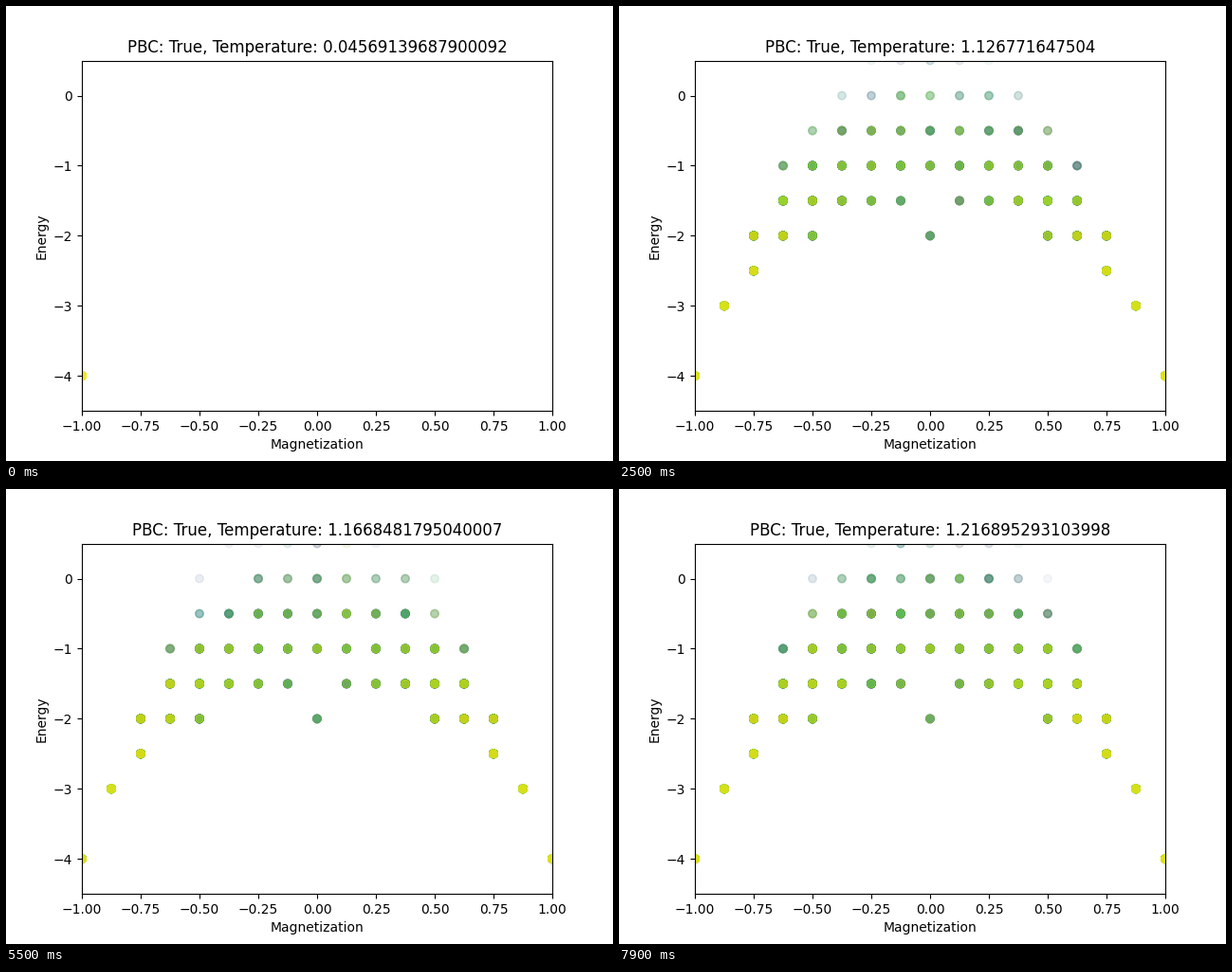
Write a matplotlib script that moves like this. It is 640x480 px and loops after 8000 ms.

```python
import numpy as np
import matplotlib.pyplot as plt
from matplotlib.animation import FuncAnimation

FRAMES = 80
SAMPLES = 20000
ALPHA = 0.05
RECENT = 60

KEY_FRAMES = [0, 4, 8, 12, 25, 37, 55, 64, 79]
KEY_TEMPS = [0.04569139687900092, 0.45136824157900093, 0.7213904126789994,
             0.870137009178999, 1.126771647504, 1.1649113723040005,
             1.1668481795040007, 1.1678387264790004, 1.216895293103998]


def density_of_states():
    """Distinct (|M|, E) pairs of the periodic 4x4 Ising lattice and their counts."""
    bits = (np.arange(2 ** 16)[:, None] >> np.arange(16)) & 1
    spins = (2 * bits - 1).reshape(-1, 4, 4)
    neighbours = np.roll(spins, 1, axis=1) + np.roll(spins, 1, axis=2)
    energy = -2 * (spins * neighbours).mean(axis=(1, 2))
    mag = np.abs(spins.mean(axis=(1, 2)))
    return np.unique(np.column_stack([mag, energy]), axis=0, return_counts=True)


STATES, COUNTS = density_of_states()


def sample(i, temp):
    """Time-ordered state indices and the sign of the magnetization."""
    rng = np.random.default_rng(100 + i)
    weights = COUNTS * np.exp(-4 * (STATES[:, 1] + 4) / temp)
    state = rng.choice(len(STATES), SAMPLES, p=weights / weights.sum())
    # The lattice flips sign rarely when cold and often when hot.
    blocks = 1 + 2 * int(round(2 * (temp / 0.87) ** 15))
    even = (np.arange(SAMPLES) * blocks // SAMPLES) % 2 == 0
    positive = even if i % 4 == 3 else ~even
    return state, positive | (STATES[state, 0] == 0)


def stack(times):
    """Thin one cell's visits: recent ones singly, older ones merged."""
    n = len(times)
    older = np.geomspace(RECENT, max(n, RECENT), 25).astype(int)
    lags = np.unique(np.r_[0:min(n, RECENT), older])
    lags = lags[lags < n]
    sizes = np.diff(np.append(lags, n))
    return times[n - 1 - lags][::-1], (1 - (1 - ALPHA) ** sizes)[::-1]


def markers(i, temp):
    state, positive = sample(i, temp)
    key = 2 * state + positive
    points, colors = [], []
    for k in np.unique(key):
        times, alphas = stack(np.flatnonzero(key == k))
        mag, energy = STATES[k // 2]
        points.append(np.tile([mag if k % 2 else -mag, energy], (len(times), 1)))
        rgba = plt.cm.viridis(times / SAMPLES / (1 + 0.03 * temp))
        rgba[:, 3] = alphas
        colors.append(rgba)
    return np.concatenate(points), np.concatenate(colors)


fig, ax = plt.subplots(figsize=(6.4, 4.8), dpi=100)
ax.set(xlim=(-1, 1), ylim=(-4.5, 0.5), xlabel="Magnetization", ylabel="Energy")
dots = ax.scatter([], [])
title = ax.set_title("")


def update(i):
    temp = float(np.interp(i, KEY_FRAMES, KEY_TEMPS))
    points, colors = markers(i, temp)
    dots.set_offsets(points)
    dots.set_facecolor(colors)
    dots.set_edgecolor(colors)
    title.set_text(f"PBC: True, Temperature: {temp}")
    return dots, title


anim = FuncAnimation(fig, update, frames=FRAMES, interval=100,
                     repeat=True, repeat_delay=0, blit=False)
plt.show()
```
